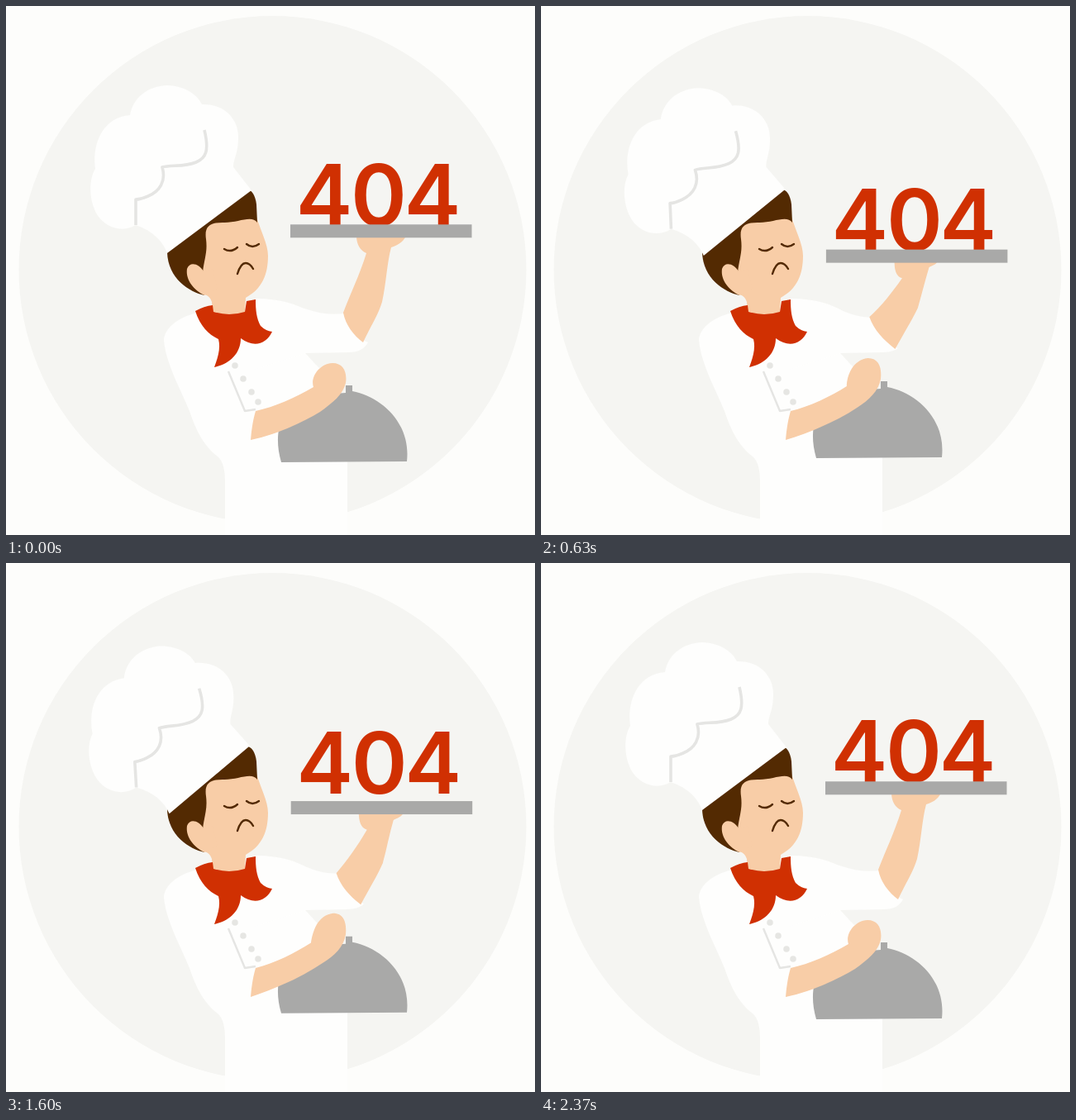
An HTML page for the animation above (2410 ms loop, 640x640 px).

```html
<!DOCTYPE html>
<html lang="en">
<head>
<meta charset="utf-8">
<title>404 chef</title>
<style>
  html, body { margin: 0; width: 100%; height: 100%; overflow: hidden; background: #fdfdfb; }
  svg { display: block; width: 100vw; height: 100vh; }
  .white { fill: #fefefd; }
  .skin { fill: #f8cda7; }
  .hair { fill: #532a02; }
  .red { fill: #d03002; }
  .metal { fill: #a9a9a8; }
  .pale { fill: #e6e6e3; }
  .seam { fill: none; stroke: #e5e5e3; stroke-linejoin: round; }
  .line { fill: none; stroke: #532a02; stroke-width: 2.4; stroke-linecap: round; }
  text { font: 600 103px Inter, Lato, sans-serif; text-anchor: middle; }
</style>
</head>
<body>
<svg viewBox="0 0 640 640">
  <circle cx="322.5" cy="319" r="307" fill="#f5f5f2"/>

  <!-- torso -->
  <path class="white" d="M232 371 C212 375 192 388 191 404 C193 432 212 465 222 490 C232 520 242 534 256 545 C263 551 265 562 265 575 V640 H413 V540 L400 460 L375 434 L362 420 L380 378 C362 368 350 355 303 354 Z"/>
  <path id="sleeve" class="white"/>
  <path class="seam" stroke-width="2.4" d="M269 442 L289 490 L302 488"/>
  <g class="pale">
    <circle cx="277" cy="435" r="3.8"/>
    <circle cx="287" cy="451" r="3.8"/>
    <circle cx="297" cy="467" r="3.8"/>
    <circle cx="305" cy="479" r="3.8"/>
  </g>

  <!-- head -->
  <path class="skin" d="M242 258 L303 255 C308 272 317 288 317 302 C317 325 310 342 290 353 L289 371 C275 375 262 373 250 371 L249 358 C247 352 243 349 238 349 L238 300 Z"/>
  <path class="hair" d="M195 298 L290 221 Q301 223 303 240 L304 262 C297 252 280 263 262 262 C245 262 240 268 242 282 C244 298 240 305 238 322 L240 350 C222 346 196 330 195 298 Z"/>
  <path class="skin" d="M239 321 C233 311 222 309 219 318 C217 332 228 344 240 350 L256 342 L250 318 Z"/>
  <path class="line" d="M264 294 Q272 299 280 292 M291 288 Q298 294 306 288 M280 324 Q284 311 290 311 Q295 311 299 318"/>
  <g id="hat">
    <path class="white" d="M195 299 C190 285 178 272 157 265 C140 275 120 268 110 252 C100 235 100 210 108 197 C104 170 115 135 150 132 C154 110 172 97 195 96 C218 97 232 108 237 119 C265 118 282 138 281 160 C281 178 275 185 275 195 L297 223 Z"/>
    <path class="seam" stroke-width="3.6" d="M240 150 C246 175 242 184 230 189 C215 195 200 192 189 195 C194 212 186 224 172 230 C165 233 160 234 157 234 V265"/>
  </g>

  <path class="red" d="M229 369 Q240 363 250 362 L251 370 Q270 376 289 370 L291 357 L302 355 C302 368 303 378 308 387 Q314 393 322 394 C315 409 300 414 284 402 C284 420 271 433 252 437 C256 426 260 415 257 403 C246 398 235 388 229 369 Z"/>

  <!-- right arm, cloche -->
  <path id="cloche" class="metal" d="M333 552 C328 535 328 520 331 508 L385 470 L411 468 V459 H419 V466 C455 473 490 505 485 551 Z"/>
  <path id="hug" class="skin"/>

  <!-- left arm, tray -->
  <path id="forearm" class="skin"/>
  <text id="code" class="red" x="385 451 516" y="265.5">404</text>
  <rect id="tray" class="metal" x="344" y="264.3" width="219.5" height="16"/>
</svg>
<script>
const LOOP = 2410;
const $ = id => document.getElementById(id);

// Each limb: raised pose, lowered pose
const limbs = {
  sleeve: [
    'M303 354 C355 356 368 377 409 372 C412 388 422 400 438 407 C434 414 428 419 415 419 L362 420 L300 440 Z',
    'M303 354 C355 356 368 377 397 377 C403 393 414 405 431 415 C426 418 418 419 412 419 L362 420 L300 440 Z'
  ],
  forearm: [
    'M432 407 C420 398 411 386 408 371 C416 350 428 325 436 299 C429 296 424 289 424 278 L484 278 C480 287 472 290 466 292 C461 310 460 335 455 358 C451 372 441 388 432 407 Z',
    'M428 416 C414 405 402 393 396 377 C411 365 424 350 437 333 C429 331 428 322 428 312 L480 312 C478 316 474 317 470 319 C465 335 461 350 456 366 C448 382 438 398 428 416 Z'
  ],
  hug: [
    'M302 490 C325 485 350 474 372 461 C368 450 378 433 395 432 C408 432 413 443 411 456 C408 470 395 480 380 491 C357 505 325 519 296 525 C297 512 299 500 302 490 Z',
    'M302 490 C325 484 350 471 368 459 C372 445 376 424 396 421 C410 421 412 434 411 447 C409 462 398 474 385 481 C358 500 325 514 296 525 C297 512 299 500 302 490 Z'
  ]
};

const clamp = x => Math.min(1, Math.max(0, x));
const span = (t, a, b) => clamp((t - a) / (b - a));
const smooth = x => x * x * (3 - 2 * x);

function bezier(x, x1, y1, x2, y2) {
  const at = (s, a, b) => 3 * (1 - s) ** 2 * s * a + 3 * (1 - s) * s * s * b + s ** 3;
  let lo = 0, hi = 1;
  for (let i = 0; i < 24; i++) {
    const mid = (lo + hi) / 2;
    if (at(mid, x1, x2) < x) lo = mid; else hi = mid;
  }
  return at(lo, y1, y2);
}

function pose(id, k) {
  const [from, to] = limbs[id];
  const ends = to.match(/\d+/g);
  let i = 0;
  $(id).setAttribute('d', from.replace(/\d+/g, n => (+n + (ends[i++] - n) * k).toFixed(2)));
}

const move = (id, value) => $(id).setAttribute('transform', value);

function draw(t) {
  const sway = (1 - Math.cos(2 * Math.PI * t / LOOP)) / 2;
  // The tray sinks, then flips the digits up; they land as the loop restarts
  const rise = smooth(span(t, 1430, 1900));
  const fall = smooth(span(t, 1900, LOOP));
  const low = bezier(span(t, 0, 900), 0.3, 0.2, 0.5, 1) - rise;
  const toss = 33 * (rise - fall);

  move('hat', `rotate(${-4.5 * sway} 267 257)`);
  move('cloche', `translate(0 ${-9.5 * sway})`);
  pose('hug', sway);

  pose('sleeve', low);
  pose('forearm', low);
  move('tray', `translate(${low} ${34 * low})`);
  move('code', `translate(${low} ${34 * low - toss})`);
}

function tick() {
  draw(performance.now() % LOOP);
  requestAnimationFrame(tick);
}
tick();
</script>
</body>
</html>
```
